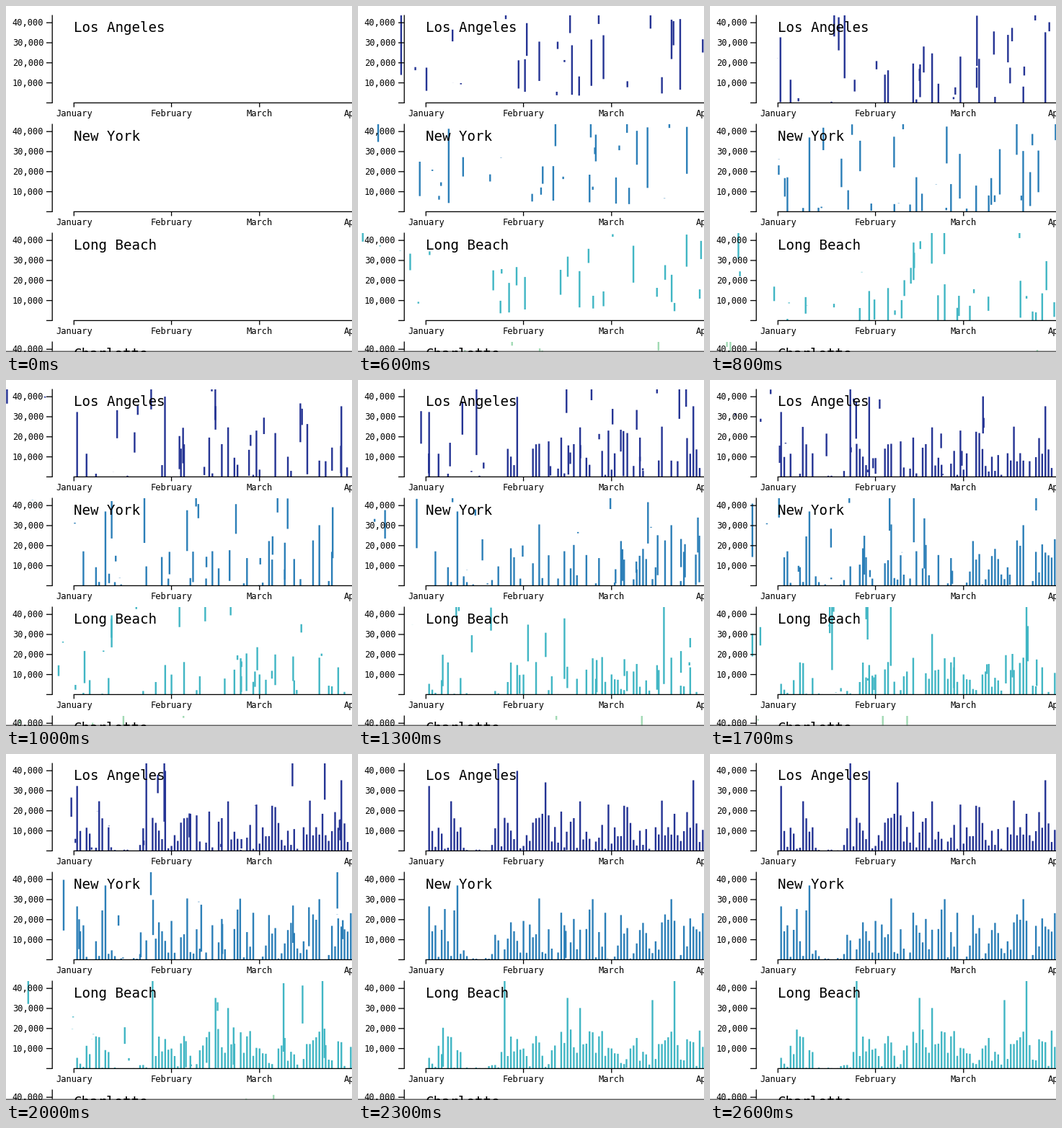
A matplotlib script for the animation above (3000 ms loop, 480 by 480 pixels).

```python
import numpy as np
import matplotlib.pyplot as plt
from matplotlib.animation import FuncAnimation
from matplotlib.collections import PolyCollection
from matplotlib.patches import Rectangle

SIZE, DPI = 480, 80
PX = 72 / DPI
FRAMES, STEP = 30, 100
PITCH, TOP, BASE = 151, 12.5, 134.4
TEN_K = 27.8                    # pixels per 10,000
X0, DAY_W, BAR_W = 94.3, 4.364, 2.4
DAYS = 116                      # includes days that only fly through the view
DROP, FLIGHT = 122, 420         # pixels, ms
FIRST_START, START_SPAN = 300, 1650

# Name, colour, usual height in pixels, skew, and the highest days.
CITIES = [
    ("Los Angeles", "#253494", 70, 1.2, {1: 90, 23: 130, 29: 111, 38: 95, 85: 98}),
    ("New York", "#2c7fb8", 72, 1.2, {1: 74, 10: 103, 36: 85, 53: 84, 78: 84}),
    ("Long Beach", "#41b6c4", 55, 1.3, {25: 130, 45: 98, 49: 84, 72: 95, 79: 130}),
    ("Charlotte", "#a1dab4", 40, 1.2, {}),
]

fig = plt.figure(figsize=(SIZE / DPI, SIZE / DPI), dpi=DPI, facecolor="white")
ax = fig.add_axes([0, 0, 1, 1])
ax.set(xlim=(0, SIZE), ylim=(SIZE, 0))
ax.axis("off")


def line(xs, ys, color="black", width=1.3):
    ax.plot(xs, ys, color=color, lw=width * PX, solid_capstyle="butt",
            snap=False, zorder=3)


def label(x, y, text, size=12, align="center"):
    ax.text(x, y, text, family="DejaVu Sans Mono", fontsize=size * PX,
            ha=align, va="baseline", zorder=4, clip_on=True)


def draw_axes(name, dy):
    base = BASE + dy
    line([64.2, 64.2], [TOP + dy, base + .6])
    for k in range(5):
        y = base - TEN_K * k
        line([56, 64], [y, y])
        if k:
            label(52.3, y + 4, f"{k}0,000", align="right")
    line([X0 - .6, SIZE], [base, base])
    for day, month in [(0, "January"), (31, "February"), (59, "March"), (90, "April")]:
        x = X0 + day * DAY_W
        line([x, x], [base, base + 6])
        label(x, base + 18.6, month)
    label(93.5, dy + 36, name, 19.2, "left")


class Bars:
    """Daily bars that slide down diagonally into place in random order."""

    def __init__(self, color, scale, skew, peaks, row):
        rng = np.random.default_rng(20 + row)
        days = np.arange(1, DAYS + 1)
        lull = 1 - .97 * np.exp(-((days - 16.5) / 5.2) ** 8)
        self.heights = scale * lull * rng.random(DAYS) ** skew
        for day, height in peaks.items():
            self.heights[day - 1] = height
        self.x = X0 + DAY_W * days
        self.base = BASE + row * PITCH
        rank = (rng.permutation(DAYS) + .5) / DAYS
        self.start = FIRST_START + START_SPAN * rank ** 1.4
        self.shapes = PolyCollection([], facecolor=color, edgecolor="none",
                                     snap=False, zorder=2)
        ax.add_collection(self.shapes)
        self.shapes.set_clip_path(Rectangle(
            (0, TOP + row * PITCH), SIZE, BASE - TOP, transform=ax.transData))

    def show(self, ms):
        u = (ms - self.start) / FLIGHT
        offset = DROP * (1 - u.clip(0, 1)) ** 2
        seen = u > 0
        left = (self.x - offset - BAR_W / 2)[seen]
        bottom = (self.base - offset)[seen]
        top = bottom - self.heights[seen]
        right = left + BAR_W
        xs = np.stack([left, right, right, left], axis=1)
        ys = np.stack([bottom, bottom, top, top], axis=1)
        self.shapes.set_verts(list(np.stack([xs, ys], axis=2)))


charts = []
for row, (name, *style) in enumerate(CITIES):
    draw_axes(name, row * PITCH)
    charts.append(Bars(*style, row))
line([0, SIZE], [479.2, 479.2], "#555555", 1.4)


def update(frame):
    for chart in charts:
        chart.show(frame * STEP)
    return [chart.shapes for chart in charts]


anim = FuncAnimation(fig, update, frames=FRAMES, interval=STEP,
                     repeat=True, repeat_delay=0, blit=False)
plt.show()
```
